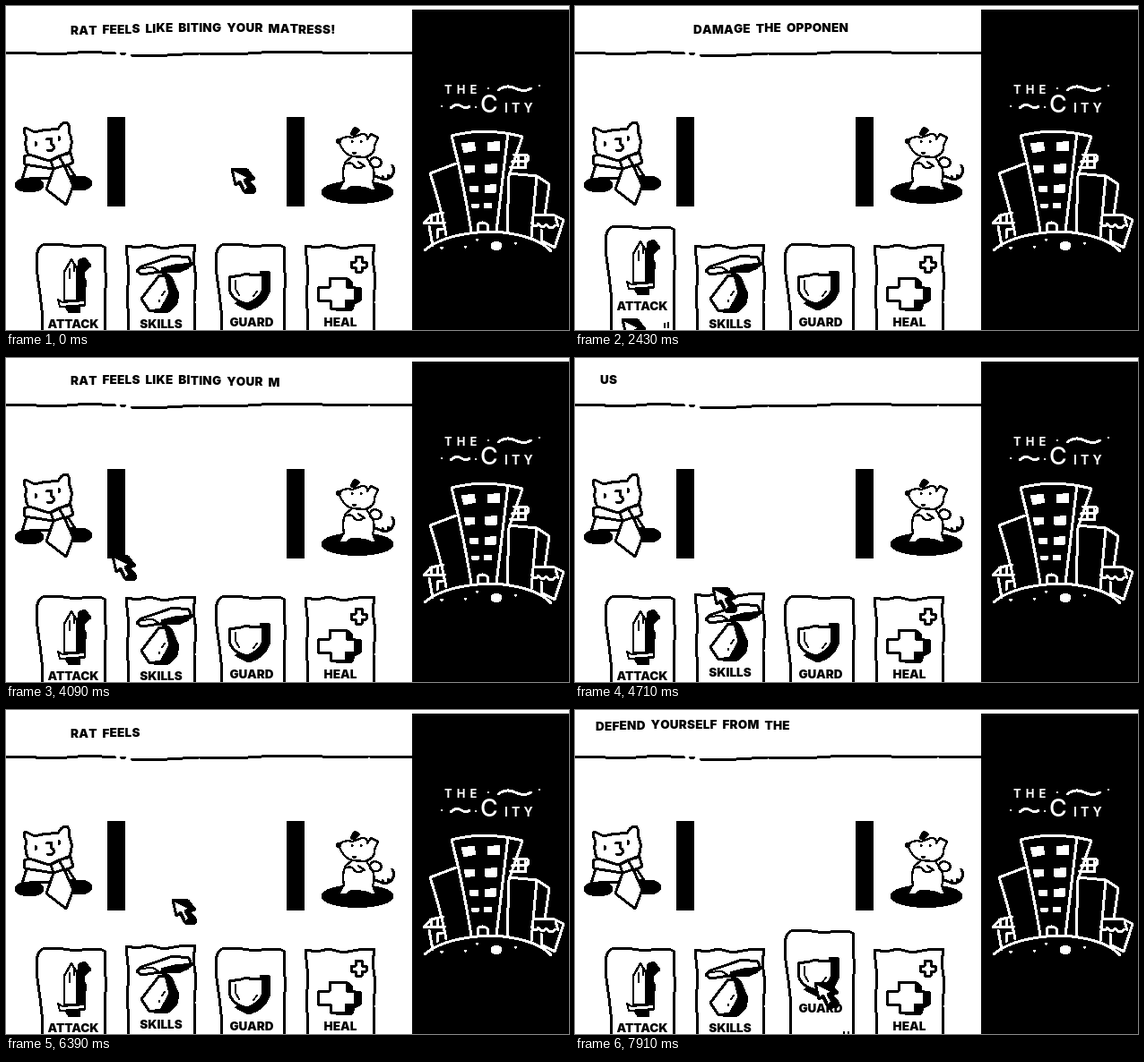
These frames come from a looping animation (628 by 362 pixels, 8 s). An HTML page:

```html
<!DOCTYPE html>
<html lang="en">
<head>
<meta charset="utf-8">
<title>Rat battle</title>
<style>
  html, body { margin: 0; width: 100%; height: 100%; overflow: hidden; background: #fff; }
  svg { display: block; width: 628px; height: 362px; }
  .ink { fill: none; stroke: #000; stroke-width: 3; stroke-linecap: round; stroke-linejoin: round; }
  .white { fill: #fff; }
  .solid { fill: #000; }
  .thin { stroke-width: 2; }
  text { font: 900 13.5px Inter, Arial, sans-serif; }
  #message { letter-spacing: .2px; word-spacing: 3px; }
  .label { text-anchor: middle; }
  .chalk { fill: none; stroke: #fff; stroke-width: 3; stroke-linecap: round; stroke-linejoin: round; }
  .chalk text { fill: #fff; stroke: none; font-weight: 700; }
  .chalk .lit { fill: #fff; stroke: #fff; stroke-width: 1; }
</style>
</head>
<body>
<svg viewBox="0 0 628 362" shape-rendering="crispEdges">
  <defs>
    <path id="roundCard" d="M40 400 L40 340 L38 322 L35 300 L34 281 Q35 270 41 267 L52 266 L64 267 L78 269 L92 267 L105 267 L111 270 L110 290 L112 305 L110 325 L111 345 L110 400"/>
    <path id="squareCard" d="M136 400 L137 350 L135 325 L137 300 L134 268 L147 270 L160 267 L176 271 L193 268 L211 267 L209 282 L212 305 L210 330 L211 400"/>
  </defs>

  <text id="message"></text>
  <path class="ink" d="M0 53 L22 52 L45 54 L68 53 L92 51 L122 53 M128 53 H133 M140 55 L180 55 L215 53 L255 54 L300 51 L335 51 L370 53 L405 52 L453 53"/>
  <path d="M113 124h20v100h-20z M313 124h20v100h-20z"/>

  <!-- cat -->
  <g class="ink">
    <ellipse class="solid" cx="26" cy="200" rx="15" ry="7"/>
    <ellipse class="solid" cx="82" cy="198" rx="13" ry="7"/>
    <path class="white" d="M23 177 L18 194 L34 192 L48 193 L77 190 L67 175Z"/>
    <path class="white" d="M25 167 Q20 155 23 147 Q18 138 22 136 L32 141 Q45 137 58 138 Q61 130 68 130 Q72 134 70 141 Q76 150 71 163 L48 174Z"/>
    <path class="white" d="M20 168 L26 166 L48 173 L58 168 L72 164 L75 175 L63 180 L52 182 L21 177Z"/>
    <path class="white" d="M50 173 L59 168 L65 178 L75 201 L67 222 L45 205 L53 182Z M53 182 L65 178"/>
    <path d="M45 149 L51 148 L50 154 Q56 156 52 161 L46 161 M33 152v4 M59 146v4"/>
  </g>

  <!-- rat -->
  <g class="ink">
    <ellipse class="solid" cx="392" cy="208" rx="39" ry="11.5"/>
    <path d="M412 190 Q426 197 431 189 Q434 184 431 178 M420 190v4 M426 189l3 3"/>
    <path class="white" d="M379 174 Q374 184 377 195 L371 206 L380 206 L385 202 L400 203 L408 206 L413 206 L409 196 Q413 187 408 178 L402 169 L386 168Z" stroke-width="2.4"/>
    <path class="white" d="M371 151 Q378 144 386 147 L397 143 Q404 143 403 149 L407 143 L415 147 L411 156 Q412 166 400 169 L386 168 Q376 165 371 151Z" stroke-width="2.4"/>
    <path class="solid" d="M385 143 L389 136 L394 139 L389 143Z"/>
    <circle class="solid" cx="371" cy="151" r="1.5"/>
    <path d="M386 151v1 M396 151v1 M387 164h3"/>
    <path stroke-width="2.4" d="M380 176 Q387 174 389 180 Q396 183 399 178 M393 174l7 5 M411 169 Q421 171 418 178 Q411 183 406 177 Q405 171 411 169"/>
  </g>

  <g class="card ink">
    <use href="#roundCard" class="white"/>
    <path class="solid" d="M82 284 L88 282 L94 290 L87 296 L86 302 L89 308 L87 320 L88 334 L80 334 L80 296Z"/>
    <path class="white" d="M65 329 V297 L73 283 L79 293 V329Z" stroke-width="2.4"/>
    <path class="white thin" d="M58 328 L63 331 L88 329 L88 334 L60 336Z"/>
    <path class="solid thin" d="M67 337 H82 V342 H70Z"/>
    <path class="thin" d="M71 294 V304 M76 291 V296 M100 375v4 M104 374v5"/>
  </g>
  <g class="card ink">
    <use href="#squareCard" class="white"/>
    <path class="solid" d="M176 297 L184 303 L192 322 L190 332 L181 341 L165 341Z"/>
    <path class="white" d="M171 301 L151 327 L160 341 L173 339 L183 321 L178 301Z"/>
    <path class="white" d="M146 296 L151 291 L172 284 L186 279 L204 281 L207 289 L195 296 L172 297 L151 300Z"/>
    <path class="solid thin" d="M174 293 L190 289 L206 288 L203 293 L192 297 L175 297Z"/>
    <path class="thin" d="M149 293 L164 292 L173 298 M174 323l3 -4 M171 329v1 M199 375v4 M205 374v5"/>
  </g>
  <g class="card ink">
    <use href="#roundCard" x="200" class="white"/>
    <path class="solid" d="M284 297 L293 297 L293 320 Q287 335 270 339 L257 332 L284 318Z"/>
    <path class="white" d="M249 303 L262 301 L268 299 L275 301 L287 300 L286 318 Q283 327 270 333 Q254 330 250 319Z"/>
    <path class="thin" d="M256 307 V316 L260 323 M280 319l-4 5 M300 380v1 M305 380v1"/>
  </g>
  <g class="card ink">
    <use href="#squareCard" x="200" class="white"/>
    <path class="solid" d="M381 305 L385 308 L386 315 L395 315 L395 329 L388 332 L386 339 L369 340 L367 335 L381 330Z"/>
    <path class="white" d="M361 304 H380 V314 H389 V329 H379 V338 H362 V329 H348 V315 L361 314Z"/>
    <path class="white" d="M390 280 H397 V286 H402 V292 H397 V297 H390 V292 H385 V286 H390Z"/>
  </g>

  <!-- city panel -->
  <rect x="453" y="4" width="175" height="358"/>
  <g class="chalk">
    <text x="489" y="98" style="font-size:13px;letter-spacing:5px">THE</text>
    <text x="529" y="119" style="font-size:27px;font-weight:500">C</text>
    <text x="556" y="119" style="font-size:14px;letter-spacing:4px">ITY</text>
    <path d="M538 92h.1 M549 94 Q558 87 568 92 T586 92 M595 89h.1 M486 112h.1 M496 114 Q502 108 508 112 T517 112 M524 113h.1"/>
    <path d="M497 145 Q535 135 576 146 L561 190 L559 252 M497 145 Q510 195 519 252 M560 142 L547 252"/>
    <path d="M502 176 L473 187 Q484 220 491 256 M561 187 L592 190 L586 258 M592 190 L606 199 L601 234"/>
    <path d="M566 166 L582 167 L582 173 L564 174 M562 180 L580 181 M571 168v12 M579 169v12"/>
    <path d="M466 243 L474 234 L488 231 M468 243 L490 242 M474 235v6 M481 234v7 M472 246 L476 268 M481 259v-9l6 -1"/>
    <path d="M588 233 L612 234 L622 239 L612 270 L597 262 M613 236 L616 246 M586 242 q4 7 8 1 q4 7 9 1 q4 7 10 1 M597 250v12"/>
    <path d="M467 273 Q490 253 545 252 Q592 256 608 274 M526 252 V244 Q531 240 537 244 V252"/>
    <path class="lit" d="M508 154 L522 152 L524 161 L511 164Z M537 153 L551 151 L550 162 L537 161Z M511 179 L522 178 L523 185 L513 187Z M534 178 L548 176 L547 186 L535 186Z M517 201 L526 201 L527 207 L518 207Z M534 201 L547 199 L546 208 L534 208Z M519 221 L527 221 L527 225 L520 225Z M533 220 L542 220 L541 226 L533 225Z"/>
    <ellipse class="lit" cx="547" cy="268" rx="6" ry="4.5"/>
    <path d="M525 261h1 M512 269h1 M485 270h2 M568 265h1"/>
  </g>

  <g id="cursor" class="ink">
    <path class="solid" d="M3 2 L18 3 L26 13 L19 15 L26 23 L26 28 L15 28 L10 19 L5 18Z"/>
    <path class="white" d="M1 2 L5 20 L10 16 L15 27 L20 23 L15 15 L20 11Z"/>
  </g>
</svg>

<script>
const LOOP = 8000, CHAR_MS = 1000 / 60, RISE = 20, RISE_MS = 300;
const idle = ["RAT FEELS LIKE BITING YOUR MATRESS!", 72, 30];
// start time, then [text, left, baseline]
const messages = [
  [-1000, idle],
  [2121, ["DAMAGE THE OPPONENT!", 132, 30]],
  [3620, idle],
  [4670, ["USE THE SKILLS YOU COLLECTED IN YOUR JOURNEY!", 28, 30]],
  [6220, idle],
  [7500, ["DEFEND YOURSELF FROM THE", 23, 22]],
];
const hovers = [[2121, 3610], [4670, 6210], [7500, Infinity], [Infinity, Infinity]];
const labels = [["ATTACK", 75, 360], ["SKILLS", 173, 360], ["GUARD", 274, 358], ["HEAL", 373, 358]];
const pauses = [750, 4860, 6570, 7910];
// time, x, y of the pointer tip
const route = [
  [0, 251, 180], [1580, 251, 180], [1900, 150, 225], [2120, 85, 255], [2400, 52, 348],
  [3290, 52, 348], [3600, 75, 231], [3900, 105, 214], [4450, 142, 228], [4710, 153, 255],
  [5000, 157, 315], [6020, 157, 315], [6210, 168, 236], [6600, 205, 180], [6950, 227, 152],
  [7320, 227, 152], [7470, 248, 205], [7520, 258, 252], [7700, 267, 303], [8000, 267, 303],
];

const message = document.getElementById("message");
const cursor = document.getElementById("cursor");
const cards = [...document.querySelectorAll(".card")];

cards.forEach((card, i) => {
  const [name, x, y] = labels[i];
  const label = document.createElementNS("http://www.w3.org/2000/svg", "text");
  label.textContent = name;
  label.setAttribute("class", "label");
  label.setAttribute("x", x);
  label.setAttribute("y", y);
  label.setAttribute("fill", "#000");
  label.setAttribute("stroke", "none");
  card.append(label);
});

const easeOut = ms => Math.sin(Math.min(Math.max(ms / RISE_MS, 0), 1) * Math.PI / 2);

function pointerAt(t) {
  const i = route.findIndex(point => point[0] > t);
  const [t0, x0, y0] = route[i - 1], [t1, x1, y1] = route[i];
  const p = (t - t0) / (t1 - t0);
  return [x0 + (x1 - x0) * p, y0 + (y1 - y0) * p].map(Math.round);
}

function drawMessage(t) {
  const [start, [text, left, baseline]] = messages.findLast(entry => entry[0] <= t);
  const typed = text.slice(0, Math.floor((t - start) / CHAR_MS));
  const wave = i => baseline + 1.5 * Math.sin(t / 200 + (left + i * 8.8) / 50);
  message.textContent = typed;
  message.setAttribute("x", left);
  message.setAttribute("y", [...typed].map((_, i) => wave(i).toFixed(1)).join(" "));
}

function draw(now) {
  const clock = now % LOOP;
  const t = pauses.find(p => clock >= p && clock < p + 100) ?? clock;
  drawMessage(t);
  cards.forEach((card, i) => {
    const [enter, leave] = hovers[i];
    const lift = Math.round(RISE * (easeOut(t - enter) - easeOut(t - leave)));
    card.setAttribute("transform", `translate(0 ${-lift})`);
  });
  cursor.setAttribute("transform", `translate(${pointerAt(t)})`);
}

let origin;
function tick(now) {
  origin ??= now;
  draw(now - origin);
  requestAnimationFrame(tick);
}
draw(0);
requestAnimationFrame(tick);
</script>
</body>
</html>
```
